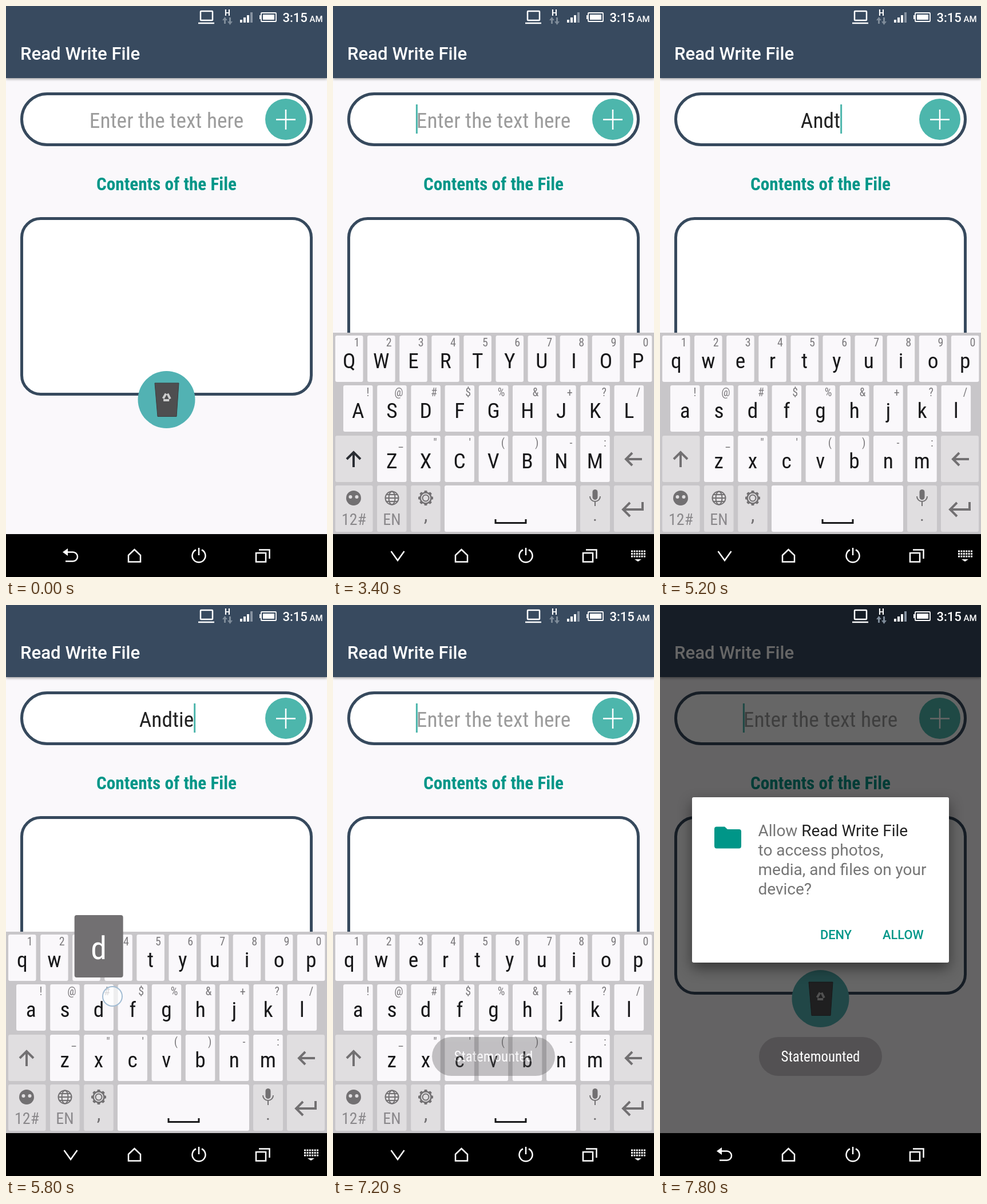
These frames come from a looping animation (561x998 px, 8 s). An HTML page:

```html
<!DOCTYPE html>
<html lang="en">
<head>
<meta charset="utf-8">
<title>Read Write File</title>
<style>
html, body { margin: 0; width: 100%; height: 100%; overflow: hidden; background: #000; }
svg { display: block; width: 100%; height: 100%; }
text { font-family: Roboto, sans-serif; white-space: pre; }
.narrow { font-family: "Roboto Condensed", Roboto, sans-serif; font-stretch: condensed; }
.mid { text-anchor: middle; }
.end { text-anchor: end; }
.medium { font-weight: 500; }
.line { fill: none; stroke: #fff; stroke-width: 2.5; }
.gray { fill: none; stroke: #727072; stroke-width: 4; }
.bar { filter: drop-shadow(0 2px 2px #0005); }
.dialog { filter: drop-shadow(0 10px 12px #0007); }
</style>
</head>
<body>
<svg id="stage" viewBox="0 0 561 998"></svg>
<script>
const LOOP = 8000, STEP = 200;
const KEYBOARD_HEIGHT = 352;

// Uniform fallback when no condensed face is installed
const condense = (() => {
  const ctx = document.createElement('canvas').getContext('2d');
  const width = font => (ctx.font = font, ctx.measureText('Contents').width);
  const ratio = width('condensed 40px "Roboto Condensed", Roboto, sans-serif') / width('40px Roboto, sans-serif');
  return ratio < 0.95 ? 1 : 0.88;
})();

const rect = (x, y, w, h, fill, r = 0, extra = '') =>
  `<rect x="${x}" y="${y}" width="${w}" height="${h}" rx="${r}" fill="${fill}" ${extra}/>`;
const path = (d, extra = 'class="line"') => `<path d="${d}" ${extra}/>`;
const circle = (x, y, r, extra) => `<circle cx="${x}" cy="${y}" r="${r}" ${extra}/>`;
const text = (x, y, s, size, fill, cls = '', extra = '') =>
  `<text x="${x}" y="${y}" font-size="${size}" fill="${fill}" class="${cls}" ${extra}>${s}</text>`;
const narrow = (x, y, s, size, fill, cls = 'mid', extra = '') =>
  `<text transform="translate(${x} ${y}) scale(${condense} 1)" font-size="${size}" fill="${fill}" class="narrow ${cls}" ${extra}>${s}</text>`;
const group = (id, body, extra = '') => `<g id="${id}" ${extra}>${body}</g>`;

const rows = [
  { letters: 'qwertyuiop', hints: '1234567890', x: 4, y: 576, w: 48.5, pitch: 56.1 },
  { letters: 'asdfghjkl', hints: '!@#$%&+?/', x: 18, y: 663, w: 51.5, pitch: 59.2 },
  { letters: 'zxcvbnm', hints: `_"'()-:`, x: 77, y: 751, w: 51.5, pitch: 59.2 },
];
const keys = {};
for (const { letters, hints, x, y, w, pitch } of rows)
  [...letters].forEach((c, i) => keys[c] = { x: x + i * pitch, y, w, hint: hints[i].replace('&', '&amp;') });

function screen() {
  const border = 'stroke="#36495d" stroke-width="5"';
  return rect(0, 0, 561, 998, '#faf8fb') +
    rect(0, 0, 561, 126, '#384a5f', 0, 'class="bar"') +
    text(25, 94, 'Read Write File', 31.2, '#fff', 'medium') +
    rect(27.5, 153.5, 506, 89, '#fff', 44.5, border) +
    narrow(280.5, 213, 'Enter the text here', 37.4, '#9c9c9c', 'mid', 'id="hint"') +
    narrow(280.5, 213, '', 37.4, '#222', 'mid', 'id="typed"') +
    rect(0, 172, 3, 51, '#4bb5ab', 0, 'id="cursor"') +
    circle(489, 198, 36, 'fill="#4db6ac"') +
    path('M472 198.5H506M489 181V216') +
    narrow(280.5, 322, 'Contents of the File', 31.2, '#009688', 'mid', 'font-weight="700"') +
    rect(27.5, 371.5, 506, 307, '#fff', 33, border) +
    circle(280.5, 688, 50, 'fill="#52b2b3"') +
    path('M260 659H302L298 717.5H265Z', 'fill="#4e4e50" stroke="#3c3c3e"') +
    path('M281 675L288 689H273Z', 'fill="none" stroke="#ccc" stroke-width="4" stroke-dasharray="10 5.5" stroke-dashoffset="-3"');
}

function statusIcons() {
  const bars = [5, 9, 13, 18].map((h, i) =>
    rect(409 + i * 6, 29 - h, 4, h, i < 3 ? '#fff' : '#8793a1')).join('');
  return rect(340, 9, 21, 16, 'none', 1, 'class="line"') + path('M336 30H364') +
    text(387, 17, 'H', 14, '#fff', 'mid', 'font-weight="700"') +
    path('M382.500 19L387 25H384V31H381V25H378ZM391.500 33L396 27H393V20H390V27H387Z', 'fill="#7e8b99"') + bars +
    rect(446, 12, 26, 15, 'none', 1, 'class="line" style="stroke-width:1.800"') +
    rect(443, 16, 3, 7, '#fff') + rect(449, 15, 20, 9, '#fff') +
    text(483.5, 28, '3:15', 22, '#fff', 'medium') + text(530.5, 28, 'AM', 15, '#fff', 'medium');
}

function keyboard() {
  const key = (x, y, w, fill = '#e0dee0') => rect(x, y, w, 81, fill, 3);
  const letters = Object.entries(keys).map(([c, k]) =>
    rect(k.x, k.y, k.w, 81, '#faf8fb', 3, `id="key-${c}"`) +
    narrow(k.x + k.w - 6, k.y + 19, k.hint, 20, '#7b797c', 'end') +
    narrow(k.x + k.w / 2, k.y + 57, c, 37.4, '#18181a', 'mid', `id="cap-${c}"`)).join('');
  const teeth = Array.from({ length: 8 }, (_, i) =>
    rect(159.5, 847, 5, 5, '#727072', 1, `transform="rotate(${i * 45} 162 860)"`)).join('');
  const thin = 'fill="none" stroke="#727072" stroke-width="2"';
  return rect(0, 571, 561, KEYBOARD_HEIGHT, '#c8c6c9') + letters +
    key(4, 751, 65.5) + key(491, 751, 66) + key(4, 838, 65.5) + key(77, 838, 51.5) +
    key(136.2, 838, 51.5) + key(195, 838, 230, '#faf8fb') + key(432, 838, 52) + key(491, 838, 66) +
    path('M36 806V780M24 792L36 780L48 792', 'id="shift" class="gray"') +
    path('M540 792H512M523 781L512 792L523 803', 'class="gray"') +
    path('M541 867V880H508M519 868L507 880L519 892', 'class="gray"') +
    circle(36, 860, 13, 'fill="#727072"') +
    circle(30.5, 858, 3, 'fill="#e0dee0"') + circle(41.5, 858, 3, 'fill="#e0dee0"') +
    circle(103, 860, 11.5, thin) + `<ellipse cx="103" cy="860" rx="5.500" ry="11.500" ${thin}/>` +
    path('M92 860H114M94 854H112M94 866H112', thin) +
    teeth + circle(162, 860, 9.5, 'fill="#e0dee0" stroke="#727072" stroke-width="2.500"') + circle(162, 860, 5.5, thin) +
    rect(453.5, 845, 9, 18, '#727072', 4.5) +
    path('M449 857A9 9 0 0 0 467 857M458 866V874', thin) +
    narrow(36.5, 907, '12#', 28, '#8a888b') + narrow(103, 907, 'EN', 28, '#8a888b') +
    narrow(162, 901, ',', 34, '#727072') + narrow(458, 900, '.', 30, '#727072') +
    path('M284 897V903.500H337V897', 'fill="none" stroke="#18181a" stroke-width="3"');
}

function navigation() {
  const dots = [0, 1, 2].map(r => path(`M521 ${953 + r * 4.5}H546`,
    'stroke="#fff" stroke-width="3" stroke-dasharray="3 1.400"')).join('');
  return rect(0, 923, 561, 75, '#000') +
    group('back', path('M105 954.500H117A8 8 0 0 1 117 970.500H104') + path('M99 954.500L108 948V961Z', 'fill="#fff"')) +
    group('collapse', path('M101.500 953L113 969L124.500 953') + dots + path('M527 967H539L533 971Z', 'fill="#fff"')) +
    path('M214 960L224.500 950L235 960V971.500H214Z') +
    path('M332 950.500A11.500 11.500 0 1 0 342 950.500M337 947V960') +
    rect(437, 956, 17, 15.5, 'none', 0, 'class="line"') + path('M442 950.500H460.500V966');
}

function dialog() {
  const gray = '#757575';
  return rect(56, 336, 449, 289, '#fff', 3, 'class="dialog"') +
    path('M99 387.500H113L118 392H138Q142 392 142 396V421Q142 425.500 138 425.500H99Q95 425.500 95 421V391.500Q95 387.500 99 387.500Z', 'fill="#009688"') +
    text(171.5, 404, 'Allow <tspan fill="#212121">Read Write File</tspan>', 28, gray) +
    ['to access photos,', 'media, and files on your', 'device?'].map((s, i) =>
      text(171.5, 438 + i * 33.8, s, 28, gray)).join('') +
    text(280, 584, 'DENY', 21.8, '#009688', 'medium') + text(389, 584, 'ALLOW', 21.8, '#009688', 'medium');
}

const stage = document.getElementById('stage');
stage.innerHTML = screen() + group('keyboard', keyboard()) +
  group('popup', rect(-42.5, -121, 85, 109, '#727072', 4) + narrow(0, -44, '', 56, '#fff', 'mid', 'id="popupCap"')) +
  rect(0, 0, 561, 998, '#000', 0, 'id="dim"') + statusIcons() +
  group('toast', rect(173, 755, 215, 68, '#535153', 34) + narrow(280.5, 798, 'Statemounted', 24.9, '#fff')) +
  group('dialog', dialog()) + navigation() +
  circle(0, 0, 17, 'id="touch" fill="#fff" fill-opacity=".7" stroke="#a3bdd4" stroke-width="2"');

const $ = id => document.getElementById(id);
const set = (id, attrs) => { for (const a in attrs) $(id).setAttribute(a, attrs[a]); };
const show = (id, on) => set(id, { visibility: on ? 'visible' : 'hidden' });
const ramp = (t, from, to) => Math.min(1, Math.max(0, (t - from) / (to - from)));
const at = (table, t) => table.findLast(row => row[0] <= t);

const typing = [[0, ''], [4000, 'A'], [4400, 'An'], [4800, 'And'], [5200, 'Andt'],
  [5600, 'Andti'], [5800, 'Andtie'], [6000, 'Andtied'], [7200, '']];
const popups = [[0, ''], [4200, 'n'], [4400, ''], [4600, 'd'], [4800, ''], [5000, 't'],
  [5200, ''], [5400, 'i'], [5600, 'e'], [5800, 'd'], [6000, '']];
const touches = [[0], [200, 262, 200], [600], [2800, 36, 788], [3000], [3800, 43, 702], [4000],
  [4200, 398, 786], [4400], [4600, 158, 694], [4800], [5000, 252, 612], [5200], [5400, 420, 612],
  [5600, 142, 610], [5800, 186, 684], [6000], [6400, 300, 874], [6600], [7000, 489, 198], [7200]];

function draw(t) {
  const open = (1 - (1 - ramp(t, 500, 1000)) ** 2) * (1 - ramp(t, 7200, 7500) ** 2);
  const upper = t >= 3000 && t < 4000;
  set('keyboard', { transform: `translate(0 ${KEYBOARD_HEIGHT * (1 - open)})` });
  show('collapse', open > 0.3);
  show('back', open <= 0.3);
  set('shift', { style: `stroke:${upper ? '#2a2d33' : '#727072'}` });

  const word = at(typing, t)[1];
  $('typed').textContent = word;
  show('hint', !word);
  const field = $(word ? 'typed' : 'hint');
  const half = field.getComputedTextLength() * condense / 2;
  set('cursor', { x: word ? 280.5 + half : 279.5 - half });
  const blinkOn = t < 4000 ? t >= 800 && t % 1000 < 500 : t < 6600 || t >= 7200 || t % 1000 < 900;
  show('cursor', blinkOn);

  const popup = at(popups, t)[1];
  const pressed = t < 5800 ? popup || (t === 3800 ? 'a' : '') : '';
  for (const c in keys) {
    $('cap-' + c).textContent = upper ? c.toUpperCase() : c;
    set('cap-' + c, { fill: c === pressed ? '#777578' : '#18181a' });
    set('key-' + c, { fill: c === pressed ? '#b9b7b9' : '#faf8fb' });
  }
  show('popup', popup);
  if (popup) {
    const k = keys[popup];
    set('popup', { transform: `translate(${k.x + k.w / 2} ${k.y})` });
    $('popupCap').textContent = popup;
  }

  const [, x, y] = at(touches, t);
  show('touch', x);
  if (x) set('touch', { cx: x, cy: y });

  const appear = ramp(t, 7200, 7550);
  set('dim', { opacity: 0.6 * appear });
  set('dialog', { opacity: appear });
  set('toast', { opacity: ramp(t, 7100, 7400) });
}

let last = -1;
function tick(now) {
  const t = Math.floor((now % LOOP) / STEP) * STEP;
  if (t !== last) draw(last = t);
  requestAnimationFrame(tick);
}
draw(0);
requestAnimationFrame(tick);
</script>
</body>
</html>
```
